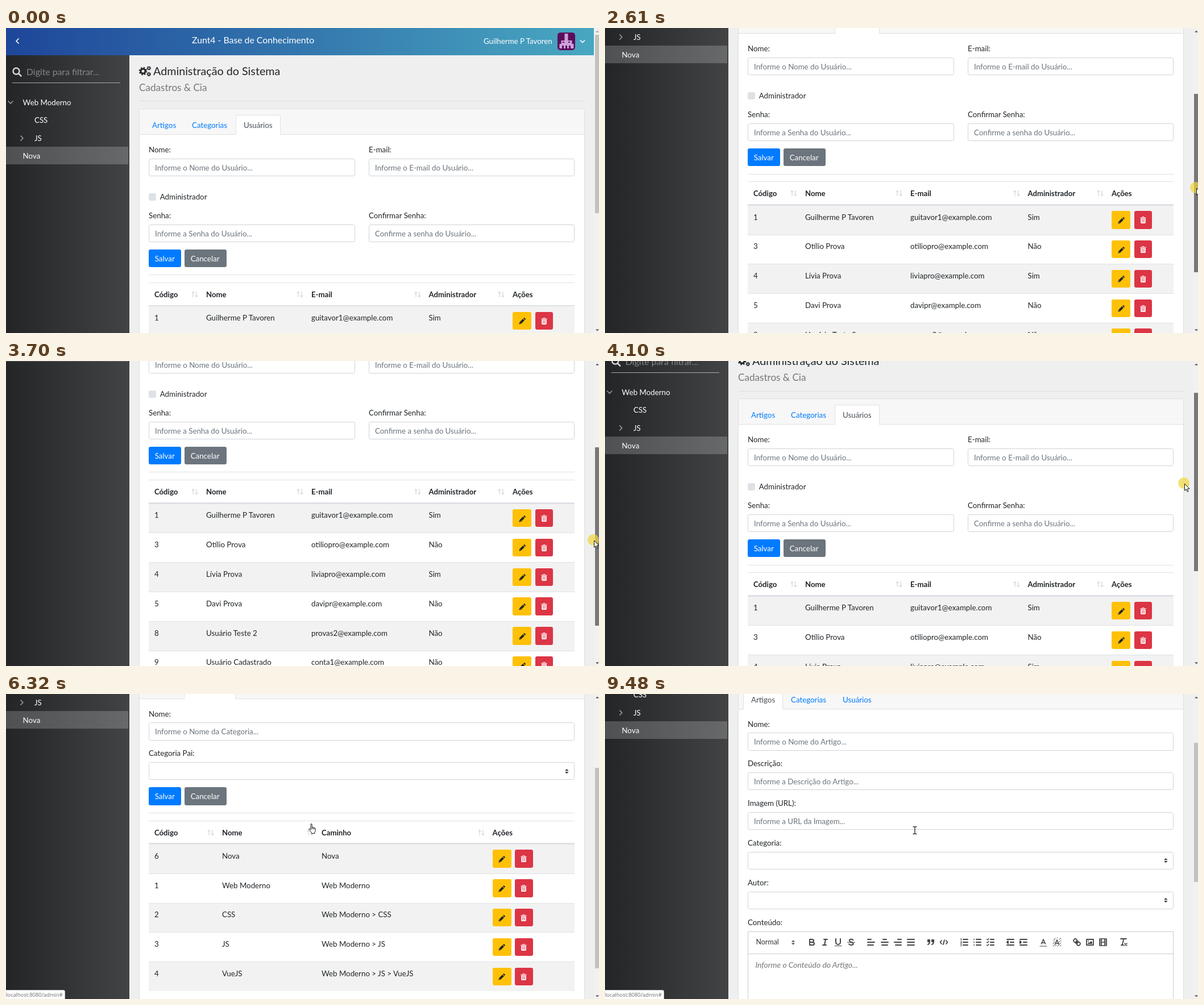
These frames come from a looping animation (1043x537 px, 9.56 s). An HTML page:

```html
<!DOCTYPE html>
<html lang="pt-BR">
<head>
<meta charset="utf-8">
<title>Base de Conhecimento</title>
<style>
html, body { margin: 0; width: 100%; height: 100%; overflow: hidden; }
#stage { position: relative; width: 1043px; height: 537px; overflow: hidden; background: #efefef;
  font: 13.32px/20px Lato, sans-serif; color: #212529; }
#stage div, #stage svg { position: absolute; box-sizing: border-box; }
.t { white-space: pre; height: 20px; }
.input { background: #fff; border: 1px solid #ced4da; border-radius: 3.3px; height: 31.3px; }
.line { height: 1px; background: #dfe1e3; }
.btn { border-radius: 3.3px; height: 31.3px; }
svg { overflow: visible; fill: none; stroke-linecap: round; stroke-linejoin: round; }
</style>
</head>
<body>
<div id="stage"></div>
<script>
const ROW = 51.8;
const stage = document.getElementById('stage');

function box(parent, x, y, w, h, css = '', cls = '') {
  const d = document.createElement('div');
  d.className = cls;
  d.style.cssText = `left:${x}px;top:${y}px;` + (w ? `width:${w}px;` : '') + (h ? `height:${h}px;` : '') + css;
  parent.append(d);
  return d;
}
// y is the middle of the line
function text(parent, x, y, str, css = '') {
  const d = box(parent, x, y - 10, 0, 0, css, 't');
  d.textContent = str;
  return d;
}
function icon(parent, x, y, w, h, view, inner, css = '') {
  const holder = document.createElement('div');
  holder.innerHTML = `<svg width="${w}" height="${h}" viewBox="${view}" style="left:${x}px;top:${y}px;${css}">${inner}</svg>`;
  const s = holder.firstChild;
  parent.append(s);
  return s;
}
const path = (d, attrs = '') => `<path d="${d}" ${attrs}/>`;
const chevron = (p, x, y, d, color) =>
  icon(p, x, y, 10, 10, '0 0 10 10', path(d, `stroke="${color}" stroke-width="1.7"`));

const page = box(stage, 0, 0, 1043, 1200);

// side menu
box(page, 0, 48, 217, 1152, 'background:linear-gradient(to right,#232526,#414345)');
icon(page, 11, 69, 17, 17, '0 0 17 17', path('M12.5 7A5.5 5.5 0 1 1 1.5 7A5.5 5.5 0 1 1 12.5 7M11 11L15.5 15.5', 'stroke="#d4d4d4" stroke-width="2.5"'));
text(page, 36, 77, 'Digite para filtrar...', 'font-size:15.8px;color:#858789');
box(page, 11, 95.6, 190, 1, 'background:#aaa');
box(page, 0, 209, 215, 31, 'background:rgba(255,255,255,.2)');
[[29.6, 131, 'Web Moderno'], [50, 162, 'CSS'], [50, 194, 'JS'], [29.6, 225, 'Nova']]
  .forEach(([x, y, s]) => text(page, x, y, s, 'color:#fff'));
chevron(page, 3, 126, 'M1 3L5 7L9 3', '#999');
chevron(page, 23, 189, 'M3 1L7 5L3 9', '#999');

// top bar
box(page, 0, 0, 1034, 48, 'background:linear-gradient(to right,#1e469a,#49a7c1)');
chevron(page, 15, 18, 'M7 1L3 5L7 9', '#fff');
text(page, 327, 21, 'Zunt4 - Base de Conhecimento', 'font-size:15.8px;color:#fff');
text(page, 840, 23, 'Guilherme P Tavoren', 'color:#fff');
icon(page, 970, 8, 31, 31, '0 0 31 31',
  '<rect width="31" height="31" rx="5" fill="#5c0d59"/>' +
  path('M12.5 2h6v12h7v6h3v8h-25v-8h3v-6h6z', 'fill="#cda0dd"') +
  path('M8 23h3v5h-3zM14 23h3v5h-3zM20 23h3v5h-3zM9 16h3v2h-3zM19 16h3v2h-3z', 'fill="#5c0d59"'));
chevron(page, 1008.5, 18.5, 'M1.5 3L5 6.5L8.5 3', '#fff');

// page heading
const gear = (x, y, r, w, n) => {
  const rim = 2 * Math.PI * (r + w * 0.7), d = rim / n / 2;
  return `<circle cx="${x}" cy="${y}" r="${r}" stroke-width="${w}"/>` +
    `<circle cx="${x}" cy="${y}" r="${r + w * 0.7}" stroke-width="${w * 0.8}" stroke-linecap="butt" stroke-dasharray="${d}"/>`;
};
icon(page, 234, 66, 21, 20, '0 0 21 20',
  gear(7, 10, 4, 3, 8) + gear(17.3, 4.8, 2, 1.6, 7) + gear(17.3, 15.4, 2, 1.6, 7), 'stroke:#212529');
text(page, 259, 76, 'Administração do Sistema', 'font-size:19.73px');
text(page, 234, 104.7, 'Cadastros & Cia', 'font-size:17.1px;color:#777');
box(page, 234, 128.4, 784, 1, '', 'line');

// shared form parts
const TABS = [['Artigos', 257, 243, 70], ['Categorias', 327, 313, 91], ['Usuários', 418, 404, 79]];
function pane(active, bottom) {
  const p = box(page, 0, 0, 1034, 1200);
  box(p, 234, 142, 784, bottom - 142, 'background:#fff;border:1px solid #dfdfdf;border-radius:3.3px');
  box(p, 235, 143, 782, 45, 'background:#f7f7f7;border-bottom:1px solid #dfdfdf;border-radius:3px 3px 0 0');
  TABS.forEach(([name, x, left, w], i) => {
    const on = i === active;
    if (on) box(p, left, 153, w, 35, 'background:#fff;border:1px solid #dee2e6;border-bottom:0;border-radius:3.3px 3.3px 0 0');
    text(p, x, 171, name, 'color:' + (on ? '#495057' : '#007bff'));
  });
  return p;
}
function field(p, x, y, w, label, hint) {
  text(p, x, y - 15.7, label);
  box(p, x, y, w, 0, '', 'input');
  if (hint) text(p, x + 11, y + 16, hint, 'color:#6c757d');
  else icon(p, 982.7, y + 11.6, 6.6, 8.2, '0 0 4 5', path('M2 0L0 2H4zM2 5L0 3H4z', 'fill="#343a40"'));
}
function buttons(p, y) {
  [[251, 57, '#007bff', 'Salvar'], [314, 73.5, '#6c757d', 'Cancelar']].forEach(([x, w, c, s]) => {
    box(p, x, y, w, 0, 'background:' + c, 'btn');
    text(p, x + 10.7, y + 16, s, 'color:#fff');
  });
  box(p, 251, y + 44.5, 749, 1, '', 'line');
}
const PENCIL = path('M1 8.2L7.2 2L10 4.8L3.8 11L.6 11.4z M8 1.2L9.1.2Q9.6-.2 10.1.2L11.8 1.9Q12.2 2.4 11.8 2.9L10.8 4z', 'fill="#212529"') +
  path('M2 8.9L3.1 10', 'stroke="#ffc107" stroke-width=".9"');
const TRASH = path('M1.2 3.6H9.8V10.6Q9.8 12 8.6 12H2.4Q1.2 12 1.2 10.6z M.2 1.7H10.8V2.8H.2z', 'fill="#fff"') +
  path('M3.6 1.7L4.2.5H6.8L7.4 1.7', 'stroke="#fff"') +
  path('M3.5 5V10M5.5 5V10M7.5 5V10', 'stroke="#dc3545" stroke-width=".8"');
const SORT = path('M3 9.5V.5M.8 3L3 .5L5.2 3M9 .5V9.5M6.8 7L9 9.5L11.2 7', 'stroke="#c4c6c8" stroke-width=".9"');

function table(p, top, cols, sorts, rows) {
  box(p, 251, top, 749, 1, '', 'line');
  cols.forEach(([x, s]) => text(p, x, top + 21, s, 'font-weight:700;font-size:13.16px'));
  sorts.forEach(x => icon(p, x - 6, top + 16, 12, 10, '0 0 12 10', SORT));
  const act = cols[cols.length - 1][0];
  rows.forEach((row, i) => {
    const y = top + 41.3 + i * ROW;
    box(p, 251, y, 749, ROW, 'border-top:1px solid #dee2e6;background:' + (i % 2 ? '#fff' : '#f2f2f2'));
    row.forEach((s, c) => text(p, cols[c][0], y + 20.8, s));
    box(p, act, y + 10.5, 33, 0, 'background:#ffc107', 'btn');
    icon(p, act + 10.5, y + 21, 12, 12, '0 0 12 12', PENCIL);
    box(p, act + 39.5, y + 10.5, 31.5, 0, 'background:#dc3545', 'btn');
    icon(p, act + 49.7, y + 20.5, 11, 12, '0 0 11 12', TRASH);
  });
  box(p, 251, top + 39.6, 749, 2, 'background:#dee2e6');
}

// users
const users = pane(2, 830);
field(users, 251, 229.7, 362.5, 'Nome:', 'Informe o Nome do Usuário...');
field(users, 638, 229.7, 362, 'E-mail:', 'Informe o E-mail do Usuário...');
box(users, 251, 290.5, 13, 13, 'background:#dee2e6;border-radius:3px');
text(users, 270.7, 297, 'Administrador');
field(users, 251, 345.7, 362.5, 'Senha:', 'Informe a Senha do Usuário...');
field(users, 638, 345.7, 362, 'Confirmar Senha:', 'Confirme a senha do Usuário...');
buttons(users, 389.7);
table(users, 448, [[261, 'Código'], [352, 'Nome'], [537, 'E-mail'], [743.5, 'Administrador'], [891, 'Ações']],
  [332, 517, 724, 871], [
    ['1', 'Guilherme P Tavoren', 'guitavor1@example.com', 'Sim'],
    ['3', 'Otílio Prova', 'otiliopro@example.com', 'Não'],
    ['4', 'Lívia Prova', 'liviapro@example.com', 'Sim'],
    ['5', 'Davi Prova', 'davipr@example.com', 'Não'],
    ['8', 'Usuário Teste 2', 'provas2@example.com', 'Não'],
    ['9', 'Usuário Cadastrado', 'conta1@example.com', 'Não']]);

// categories
const cats = pane(1, 732);
field(cats, 251, 229.6, 749, 'Nome:', 'Informe o Nome da Categoria...');
field(cats, 251, 299.5, 749, 'Categoria Pai:');
buttons(cats, 343.6);
table(cats, 402, [[261, 'Código'], [380, 'Nome'], [555, 'Caminho'], [855.5, 'Ações']], [360, 535, 836], [
  ['6', 'Nova', 'Nova'],
  ['1', 'Web Moderno', 'Web Moderno'],
  ['2', 'CSS', 'Web Moderno > CSS'],
  ['3', 'JS', 'Web Moderno > JS'],
  ['4', 'VueJS', 'Web Moderno > JS > VueJS']]);

// articles
const arts = pane(0, 1077);
[['Nome:', 'Informe o Nome do Artigo...'], ['Descrição:', 'Informe a Descrição do Artigo...'],
  ['Imagem (URL):', 'Informe a URL da Imagem...'], ['Categoria:'], ['Autor:']]
  .forEach(([label, hint], i) => field(arts, 251, 229.6 + 69.85 * i, 749, label, hint));
text(arts, 251, 563.5, 'Conteúdo:');
box(arts, 251, 579, 749, 400, 'border:1px solid #ccc');
box(arts, 251, 618, 749, 1, 'background:#ccc');
text(arts, 265.5, 598.4, 'Normal', 'font-size:12.4px;font-weight:500;color:#444');
text(arts, 264.5, 638, 'Informe o Conteúdo do Artigo...', 'font-size:13.9px;font-style:italic;color:#777');

// editor toolbar, drawn on an 18 unit grid
const rows3 = (a, b, c) => [a, b, c].map(([x1, x2], i) => `M${x1} ${4 + 5 * i}H${x2}`).join('');
const full = [3, 15], F = 'fill="#444" stroke="none"', THIN = 'stroke-width="1"';
const letterA = path('M5.5 11L9 3L12.5 11M6.4 9H11.6', 'stroke-width="1.6"');
const TOOLS = [
  [364, path('M5 4H9.5A2.5 2.5 0 0 1 9.5 9H5zM5 9H10.5A2.5 2.5 0 0 1 10.5 14H5z')],
  [387, path('M7 4H13M5 14H11M8 14L10 4')],
  [410, path('M5 3V9A4 4 0 0 0 13 9V3') + path('M3 15.5H15', THIN)],
  [433, path('M12.5 5.3C11 3.2 6 3.3 5.8 6C5.7 9 12.8 8.8 12.6 11.8C12.3 14.6 7 14.8 5.2 12.4') + path('M2.5 9.3H15.5', THIN)],
  [468, path(rows3([3, 9], full, [3, 13]))],
  [491.5, path(rows3([6, 12], full, [4, 14]))],
  [515, path(rows3([9, 15], full, [5, 15]))],
  [538, path(rows3(full, full, full))],
  [573, path('M4 5H7V8H4zM11 5H14V8H11zM7 8C7 12 4 13 4 13M14 8C14 12 11 13 11 13', 'fill="#444"')],
  [596, path('M5 6L2.5 9L5 12M13 6L15.5 9L13 12M10 5L8 13', 'stroke-width="1.8"')],
  [631.5, path(rows3([7, 15], [7, 15], [7, 15])) + path('M2.5 3L3.5 2.5V6M2.5 7.8Q4.5 7.2 4.2 8.8L2.5 10.5H4.5M2.5 12.5H4.3L3.3 13.8Q5 14.5 3.8 15.6L2.5 15.6', THIN)],
  [655, path(rows3([7, 15], [7, 15], [7, 15]) + rows3([3, 3], [3, 3], [3, 3]))],
  [678, path(rows3([9, 15], [9, 15], [9, 15])) + path('M2.5 4L4 5L6 2.8M2.5 9L4 10L6 7.8M2.5 14L4 15L6 12.8', 'stroke-width="1.5"')],
  [713, path(rows3(full, [9, 15], full)) + path('M5 7V11L3 9z', 'fill="#444"')],
  [736, path(rows3(full, [9, 15], full)) + path('M3 7V11L5 9z', 'fill="#444"')],
  [771, path('M3 16H15', THIN) + `<g transform="translate(0 1)">${letterA}</g>`],
  [794.5, path('M2 16L4 14M2 12L5 8M3 6L6 2M9 2L10 1M13 4L16 2M13 8L16 6M14 12L16 10M6 16L8 14M10 16L12 14M14 16L16 14', THIN) +
    `<g transform="translate(0 2)">${letterA}</g>`],
  [829.5, path('M7 11L11 7M8.9 4.6A3.5 3.5 0 0 1 4.6 8.9C3.2 7.5 2 6.4 4.2 4.2S7.5 3.2 8.9 4.6zM13.4 9.1A3.5 3.5 0 0 0 9.1 13.4C10.5 14.8 11.6 16 13.8 13.8S14.8 10.5 13.4 9.1z', 'stroke-width="1.8"')],
  [853, path('M3 4H15V14H3z', 'stroke-width="1.8"') + path('M5 12V11L7 9L8 10L11 7L13 9V12zM5 7A1 1 0 0 1 7 7A1 1 0 0 1 5 7', F)],
  [876, path('M3 3H15V15H3zM6 3V15M12 3V15M6 9H12', 'stroke-width="1.7"') + path('M3 6H6M3 9H6M3 12H6M12 6H15M12 9H15M12 12H15', THIN)],
  [911.5, path('M4 3H14M9.3 3.5L7 13M5 14H9', 'stroke-width="1.8"') + path('M11 11L15 15M15 11L11 15', 'stroke-width="1.6"')]
];
TOOLS.forEach(([x, d]) => icon(arts, x - 9, 589.4, 18, 18, '0 0 18 18', d, 'stroke:#444;stroke-width:2'));
icon(arts, 327.5, 594, 6, 9, '0 0 6 9', path('M0 3.4L3 .4L6 3.4zM0 5.6L3 8.6L6 5.6z', 'fill="#444"'));

// scroll bar, status bar, pointer
const bar = box(stage, 1034, 0, 9, 537, 'background:#f1f1f1');
const thumb = box(bar, 2, 12, 7, 314);
const upArrow = icon(bar, 3, 4, 6, 4, '0 0 6 4', path('M0 3.5L3 .5L6 3.5z'));
icon(bar, 3, 529.5, 6, 4, '0 0 6 4', path('M0 .5L3 3.5L6 .5z', 'fill="#505050"'));

const status = box(stage, -1, 521, 105, 17, 'background:#fff;border:1px solid #c8c8c8;border-radius:0 3px 0 0;overflow:hidden');
text(status, 0, 8, 'localhost:8080/admin#', 'font-family:"Open Sans",sans-serif;font-size:9.3px;color:#6a6a6a');

const pointer = box(stage, 0, 0, 1, 1);
const halo = box(pointer, -11, -11, 20, 20, 'border-radius:50%;background:rgba(240,214,60,.7)');
const OUTLINE = 'fill="#fff" stroke="#000" stroke-width=".9"';
const shapes = {
  arrow: icon(pointer, 0, 0, 10, 15, '0 0 10 15', path('M.5.5V12.2L3.2 9.7L5.2 14.2L7 13.4L5 9H8.8z', OUTLINE)),
  text: icon(pointer, -4, -7, 8, 14, '0 0 8 14', path('M1 .6H3L4 1.4L5 .6H7M4 1.4V12.6M1 13.4H3L4 12.6L5 13.4H7', 'stroke="#111" stroke-width="1.2"')),
  hand: icon(pointer, -6, -9, 13, 18, '0 0 13 18',
    path('M4 10.5V2Q4 .6 5.1.6T6.2 2V6.6Q8 6 8.3 7.2Q10 6.6 10.3 8Q12.2 7.6 12.2 9.3V12Q12.2 14 11 15.4V17.4H5V15.6L1 10.6Q.5 9.4 1.5 9T4 10.5z', OUTLINE) +
    path('M6.2 6.6V10M8.3 7.2V10M10.3 8V10', 'stroke="#000" stroke-width=".8"'))
};

// timing, counted in steps of the 120-step loop
const LOOP = 9560, STEP = 79.08;
const SCROLL = [[23, 0], [27, 29.6], [36, 296], [37, 299.9], [39, 308], [42, 308], [43, 304], [44, 304], [51, 75.7], [55, 0],
  [67, 0], [68, 12.3], [69, 60], [70, 82.2], [72, 164.4], [74, 243], [76, 243], [77, 230], [79, 179.4], [80, 166], [81, 161.4]];
const POINT_X = [[13, 1062], [17, 1047], [22, 1040], [44, 1040], [51, 1019], [55, 1012], [60, 395], [62, 360], [64, 400],
  [67, 542], [74, 542], [78, 538], [90, 538], [98, 310], [101, 280], [108, 280], [117, 519], [118, 536], [119, 545]];
const POINT_Y = [[13, 232], [17, 204], [22, 178], [44, 178], [51, 171.7], [60, 171], [62, 169], [64, 185], [67, 237],
  [90, 237], [98, 28], [101, 10], [108, 10], [117, 205], [118, 228], [119, 240]];
const SHAPE = [[0, ''], [14, 'arrow'], [60, 'hand'], [64, 'arrow'], [66, 'text'], [70, 'arrow'], [78, 'hand'],
  [82, 'arrow'], [100, 'hand'], [110, 'arrow'], [118, 'text']];
const THUMB = [[0, '#c1c1c1'], [18, '#a8a8a8'], [23, '#787878'], [56, '#c1c1c1']];
const VIEW = [[0, [users, 877]], [62, [cats, 780]], [107, [arts, 1124]]];
const STATUS = [[0, 0], [60, 1], [92, 0], [103, 0.5], [104, 1]];

const held = (table, n) => table.filter(k => k[0] <= n).pop()[1];
function lerp(table, n) {
  if (n <= table[0][0]) return table[0][1];
  for (let i = 1; i < table.length; i++) {
    const [a, va] = table[i - 1], [b, vb] = table[i];
    if (n <= b) return va + (vb - va) * (n - a) / (b - a);
  }
  return table[table.length - 1][1];
}

function draw(ms) {
  const n = ms < 70 ? 0 : Math.min(119, Math.floor((ms - 70) / STEP + 0.1));
  const scroll = lerp(SCROLL, n);
  const [view, height] = held(VIEW, n);
  page.style.top = -scroll + 'px';
  [users, cats, arts].forEach(p => p.style.display = p === view ? 'block' : 'none');

  const shift = scroll * 513 / height;
  thumb.style.top = 12 + shift + 'px';
  thumb.style.height = 513 * 537 / height + 'px';
  thumb.style.background = held(THUMB, n);
  upArrow.style.fill = scroll ? '#505050' : '#a3a3a3';
  status.style.opacity = held(STATUS, n);

  const kind = held(SHAPE, n), dragging = n >= 23 && n < 56;
  pointer.style.left = lerp(POINT_X, n) + 'px';
  pointer.style.top = lerp(POINT_Y, n) + (dragging ? shift : 0) + 'px';
  for (const k in shapes) shapes[k].style.display = k === kind ? 'block' : 'none';
  halo.style.display = kind && n < 57 ? 'block' : 'none';
}

const start = performance.now();
function tick() {
  draw((performance.now() - start) % LOOP);
  requestAnimationFrame(tick);
}
tick();
</script>
</body>
</html>
```
